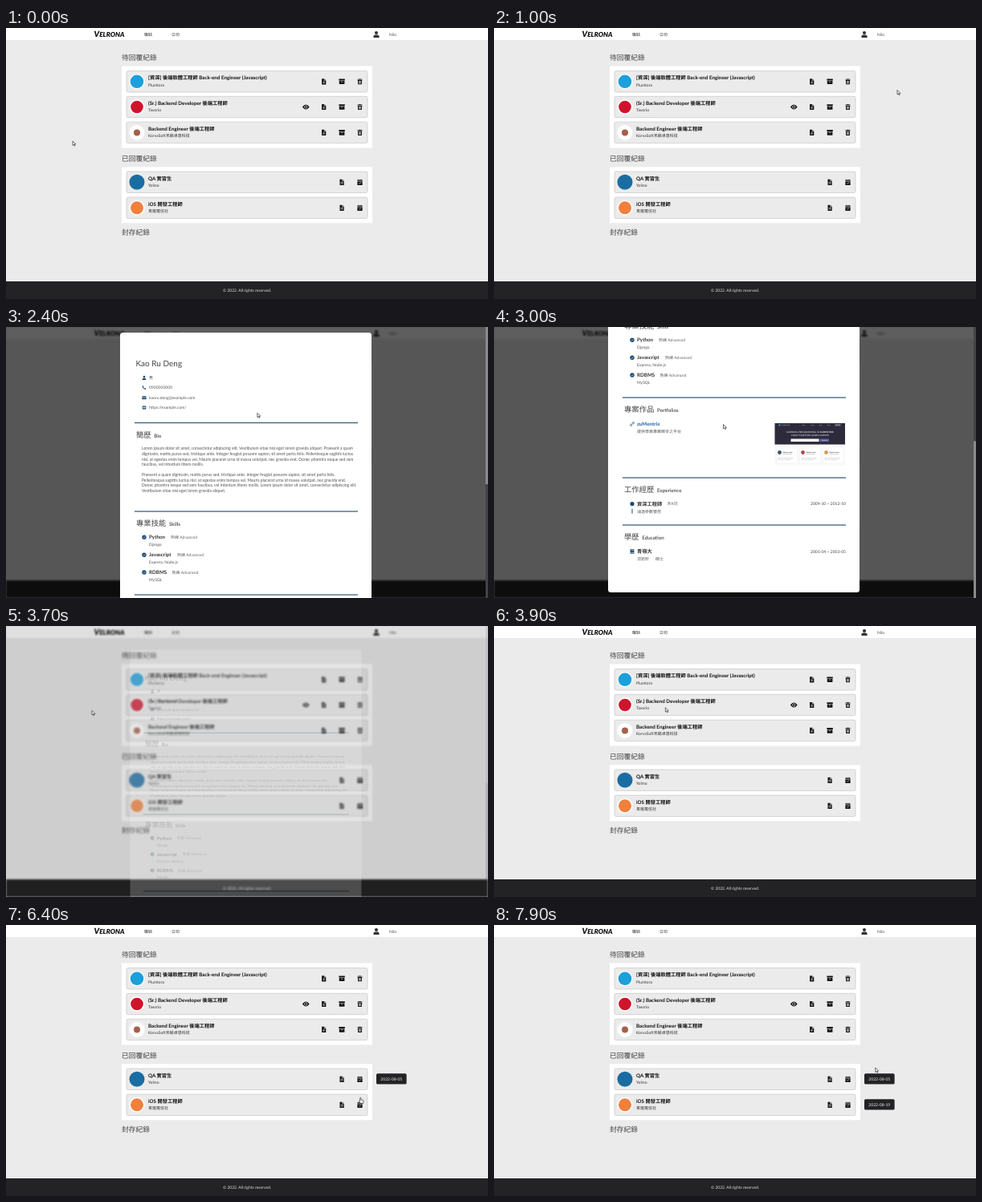
Write an HTML page that moves like this. It is 600x338 px and loops after 8000 ms.

```html
<!DOCTYPE html>
<html lang="zh-Hant">
<head>
<meta charset="utf-8">
<style>
html, body { margin: 0; width: 100%; height: 100%; overflow: hidden; background: #ebebeb; }
svg { display: block; width: 600px; height: 338px; }
svg, p { font-family: Lato, "Noto Sans CJK TC", "Noto Sans CJK JP", sans-serif; }
text { text-rendering: geometricPrecision; white-space: pre; }
p { margin: 0 0 5.6px; font-size: 5px; line-height: 6.8px; height: 27.2px; overflow: hidden; color: #555; }
</style>
</head>
<body>
<svg id="stage" viewBox="0 0 600 338"></svg>
<script>
const NAVY = '#1c4a72', ROW = '#ebebeb', LOOP = 8000;

const rect = (x, y, w, h, fill, more = '') =>
  `<rect x="${x}" y="${y}" width="${w}" height="${h}" fill="${fill}" ${more}/>`;
const disc = (x, y, r, fill) => `<circle cx="${x}" cy="${y}" r="${r}" fill="${fill}"/>`;
const path = (d, more = '') => `<path d="${d}" ${more}/>`;
const text = (x, y, size, str, fill = '#333', more = '') =>
  `<text x="${x}" y="${y}" font-size="${size}" fill="${fill}" ${more}>${str}</text>`;
const BOLD = 'font-weight="700"', MID = 'text-anchor="middle"', END = 'text-anchor="end"';

// Icons are centred on 0,0; details are cut in the row colour.
const cut = d => path(d, `fill="none" stroke="${ROW}" stroke-width=".7"`);
const sheet = path('M-2.6-3.6H.7L2.6-1.7V3.6H-2.6Z') + cut('M.6-3.6V-1.6H2.6');
const icons = {
  download: sheet + cut('M0-.9V1.9M-1.3.8L0 2.1 1.3.8'),
  lines: sheet + cut('M-1.5.1H1.5M-1.5 1.7H1.5'),
  archive: path('M-3.7-3.3H3.7V-1.4H-3.7ZM-3.3-.9H3.3V3.3H-3.3Z') + cut('M-1.1.3H1.1'),
  trash: path('M-3-3.1H-1.1L-.7-3.6H.7L1.1-3.1H3V-2.3H-3ZM-2.7-1.8H2.7L2.4 3.5H-2.4Z') +
    cut('M-1.2-.8V2.6M0-.8V2.6M1.2-.8V2.6'),
  eye: path('M-4.4 0Q0-6 4.4 0Q0 6-4.4 0Z') + disc(0, 0, 2, ROW) + disc(0, 0, 1.3, '#111'),
  calendar: path('M-3.1-2.8H-2V-3.6H-1.1V-2.8H1.1V-3.6H2V-2.8H3.1V3.6H-3.1Z') +
    cut('M-3.1-1.2H3.1M-1.4 1.1L-.4 2.1 1.5.2'),
  user: `<circle cy="-2" r="2.1"/>` + path('M-3.7 3.9Q-3.7.6-1 .6H1Q3.7.6 3.7 3.9Z'),
  check: '<circle r="2.7"/>' + cut('M-1.3.1L-.3 1 1.4-.8'),
  dot: '<circle r="2.6"/>',
  link: path('M-.6.6L.6-.6M-.2-1.2L.8-2.1Q1.6-2.5 2.2-1.9T2.1-.7L1.2.2M.2 1.2L-.8 2.1Q-1.6 2.5-2.2 1.9T-2.1.7L-1.2-.2',
    `fill="none" stroke="${NAVY}" stroke-width=".9"`),
  book: path('M-2.4-2.7H2.4V2.7H-1.8Q-2.4 2.7-2.4 2Z') + cut('M-1.7 1.6H2.4M-1-1.3H1.4'),
  phone: path('M-2.4-2L-1.2-2.4-.5-.9-1.1-.3Q-.5.7.3 1.1L.9.5 2.4 1.2 2 2.4Q-1.8 2.3-2.4-2Z'),
  mail: path('M-2.6-2H2.6V2H-2.6Z') + cut('M-2.6-1.6L0 .5 2.6-1.6'),
  globe: '<circle r="2.5"/>' + cut('M-2.5 0H2.5M0-2.5V2.5')
};
const icon = (name, x, y, fill = '#111', scale = 1) =>
  `<g transform="translate(${x} ${y}) scale(${scale})" fill="${fill}">${icons[name]}</g>`;

const job = (cy, title, firm, color, r, tools) =>
  rect(150, cy - 13.2, 300, 26.4, ROW, 'rx="2" stroke="#c6c6c6" stroke-width=".7"') +
  disc(163, cy, 9.5, '#fff') + disc(163, cy, r, color) +
  text(177, cy - 2.4, 6.25, title, '#111', BOLD) + text(177, cy + 5.9, 5, firm) +
  tools.map((name, i) => icon(name, 440.5 - 22.4 * i, cy)).join('');

const pending = ['trash', 'archive', 'download'], replied = ['calendar', 'lines'];
const page =
  rect(0, 0, 600, 338, ROW) + rect(0, 15, 600, 1, '#dcdcdc') + rect(0, 0, 600, 15.4, '#fff') +
  text(109.5, 11, 10, 'V<tspan font-size="8.3">ELRONA</tspan>', '#111', 'font-weight="900" font-style="italic"') +
  text(172, 9.8, 5, '職缺') + text(206, 9.8, 5, '公司') +
  icon('user', 461, 8, '#333') + text(477, 9.8, 5, 'Nilo', '#555') +
  text(144, 40.2, 8.75, '待回覆紀錄', '#444') + rect(144, 47.5, 312, 102, '#fff') +
  job(66.8, '[資深] 後端軟體工程師 Back-end Engineer (Javascript)', 'Plumtora', '#1ba0dc', 8.3, pending) +
  job(98.5, '(Sr.) Backend Developer 後端工程師', 'Tavorio', '#d0142c', 7.8, [...pending, 'eye']) +
  job(130.4, 'Backend Engineer 後端工程師', 'KorvaSoft禾銘卓恩科技', '#a5604a', 4, pending) +
  text(144, 166, 8.75, '已回覆紀錄', '#444') + rect(144, 173.3, 312, 70, '#fff') +
  job(192.3, 'QA 實習生', 'Yolmo', '#1a6da3', 9.5, replied) +
  job(224.3, 'iOS 開發工程師', '青嵐電信社', '#f0803c', 8, replied) +
  text(144, 257.8, 8.75, '封存紀錄', '#444') +
  rect(0, 316, 600, 22, '#232325') +
  text(300, 328.7, 5, '© 2022. All rights reserved.', '#e4e4e4', MID);

const badge = (id, y, date) => `<g id="${id}">` +
  rect(461, y, 37.6, 13.4, '#232325', 'rx="1.6"') + text(479.8, y + 8.5, 5, date, '#f2f2f2', MID) + '</g>';

const rule = y => rect(160, y - .6, 278, 1.2, '#2d5675');
const heading = (y, han, latin) => text(162, y + 3.4, 9.375, han, '#444') +
  text(165.5 + 9.375 * han.length, y + 3.4, 6.25, latin, '#444', 'font-weight="600"');
const contact = (y, name, str) => icon(name, 172, y, NAVY, name == 'user' ? .65 : 1) + text(178, y + 1.8, 5, str, '#555');
const skill = (y, name, x, tech) => icon('check', 172, y, NAVY) +
  text(178, y + 2.2, 6.25, name, '#333', BOLD) +
  text(x, y + 1.8, 5, '熟練 Advanced', '#666') + text(178, y + 11.2, 5, tech, '#555');
const entry = (y, name, title, dates) => icon(name, 172, y, NAVY) +
  text(178, y + 2.2, 6.25, title, '#333', BOLD) + text(438, y + 1.8, 5, dates, '#444', END);

const lorem = 'Lorem ipsum dolor sit amet, consectetur adipiscing elit. Vestibulum vitae nisi eget lorem gravida aliquet. ' +
  'Praesent a quam dignissim, mattis purus sed, tristique ante. Integer feugiat posuere sapien, sit amet porta felis. ' +
  'Pellentesque sagittis luctus nisl, at egestas enim tempus vel. Mauris placerat urna id massa volutpat, nec gravida erat. ' +
  'Donec pharetra neque sed sem faucibus, vel interdum libero mollis.';

const thumb = '<g transform="translate(349.5 366)">' +
  rect(0, 0, 87.5, 52.5, '#fafafa') + rect(0, 0, 87.5, 26.5, '#2d2b3b') +
  disc(6, 2.4, 1.1, '#4aa3d8') + text(8.5, 3, 1.8, 'ZUMENTRIX', '#ddd') +
  [34, 45, 55, 65].map(x => text(x, 3, 1.7, 'Menu', '#ccc')).join('') + rect(75, 1, 7, 2.6, '#77758a', 'rx=".5"') +
  text(43.8, 11.6, 2.9, 'LEARNING PROGRAMMING IN <tspan font-weight="700">ZUMENTRIX</tspan>', '#eee', MID) +
  text(43.8, 15.8, 2.9, 'CODE TOGETHER LEARN HAPPIER', '#eee', MID) +
  rect(20, 19.5, 35, 3.5, '#fff') + rect(56, 19.5, 11.5, 3.5, '#6460a8') + text(61.7, 21.9, 1.9, 'Search', '#fff', MID) +
  [['#39505c', 2], ['#b5434f', 31], ['#d59a4c', 60]].map(([c, x]) =>
    rect(x, 31, 26, 19, '#fff', 'stroke="#e4e4e4" stroke-width=".3"') + disc(x + 4, 36.5, 2.4, c) +
    text(x + 8, 36.5, 2, 'Mentor name', '#333', BOLD) + text(x + 8, 39, 1.7, 'Web developer', '#777') +
    text(x + 2, 43.6, 1.7, 'Learn to build a web page', '#888') + text(x + 2, 46.2, 1.7, 'with clear small steps', '#888')
  ).join('') + '</g>';

const modal =
  rect(142, 7, 313, 570, '#fff', 'rx="3.5"') +
  text(161.5, 49, 10, 'Kao Ru Deng', '#444') +
  contact(63.4, 'user', '男') + contact(75.6, 'phone', '0900000000') +
  contact(88.2, 'mail', 'kaoru.deng@example.com') + contact(100.5, 'globe', 'https://example.com/') +
  rule(119.5) + heading(134.3, '簡歷', 'Bio') +
  `<foreignObject x="169" y="148" width="269" height="70"><p>${lorem}</p><p>${lorem.slice(107)} ${lorem.slice(0, 106)}</p></foreignObject>` +
  rule(230) + heading(244.2, '專業技能', 'Skills') +
  skill(262.2, 'Python', 205, 'Django') + skill(284.2, 'Javascript', 213, 'Express, Node.js') +
  skill(306, 'RDBMS', 206.5, 'MySQL') +
  rule(334) + heading(349, '專案作品', 'Portfolios') +
  icon('link', 172, 367, NAVY) + text(178, 369, 6.25, 'zuMentrix', '#1c5fa6', BOLD) +
  text(178, 377.6, 5, '提供學員專案媒合之平台', '#555') + thumb +
  rule(434) + heading(448.5, '工作經歷', 'Experience') +
  entry(466.6, 'dot', '資深工程師', '2009-10 ~ 2012-10') + text(215.5, 468.4, 5, '禾K坊', '#666') +
  rect(171.5, 472.6, 1, 6, NAVY) + text(178, 477.6, 5, '油溫參數管控', '#555') +
  rule(493) + heading(508, '學歷', 'Education') +
  entry(526, 'book', '青嶺大', '2001-04 ~ 2003-05') +
  text(178, 536.8, 5, '沼岩所', '#555') + text(201, 536.8, 5, '碩士', '#555');

const outline = 'fill="#fff" stroke="#111" stroke-width=".6" stroke-linejoin="round"';
stage.innerHTML =
  `<g id="base">${page}${badge('date1', 185.2, '2022-08-05')}${badge('date2', 217.2, '2022-08-19')}</g>` +
  rect(0, 0, 600, 338, '#000', 'id="shade"') +
  `<g id="box">${modal}</g>` +
  `<g id="bar">${rect(597, 0, 3, 338, '#444')}${rect(597, 0, 3, 196, '#8a8a8a', 'id="grip"')}</g>` +
  '<g id="loader">' + rect(0, 0, 600, 338, '#fff', 'id="veil"') +
  path('M4.2-3.8A5.7 5.7 0 1 0 4.2 3.8', 'id="ring" fill="none" stroke="#222" stroke-width="1.4"') + '</g>' +
  '<g id="pointer">' + path('M0 0V5.4L1.3 4.3 2.2 6.2 3 5.8 2.2 4H3.9Z', outline + ' id="arrow"') +
  path('M.7 4.6V.7Q1.3-.1 1.9.7V2.9L4.7 3.5Q5.2 3.7 5.1 4.4L4.5 7.6H1.4L-.6 4.9Q-.4 4 .7 4.6Z', outline + ' id="hand"') + '</g>';

// Linear interpolation through rows of [time, ...values].
function at(keys, t) {
  const i = keys.findIndex(k => k[0] > t);
  if (i < 0) return keys.at(-1).slice(1);
  if (!i) return keys[0].slice(1);
  const a = keys[i - 1], b = keys[i], f = (t - a[0]) / (b[0] - a[0]);
  return a.slice(1).map((v, j) => v + (b[j + 1] - v) * f);
}

const moves = [[100, 83, 141], [300, 140, 32], [500, 165, 205], [650, 300, 220], [800, 520, 150], [1000, 502, 77.5],
  [1200, 440, 70], [1500, 395, 64.5], [2100, 395, 64.5], [2500, 285.5, 121.5], [3100, 285.5, 121.5], [3450, 107, 105.5],
  [3700, 107, 105.5], [4200, 373, 96], [4600, 373, 96], [4950, 491.5, 104.5], [5500, 491.5, 104.5], [5900, 440, 191],
  [6150, 440, 191], [6500, 440, 224.5], [6900, 440, 224.5], [7300, 490, 128], [7800, 520, 156.5], [7900, 474.8, 178]];
// open, shade, blur, veil
const phases = [[1700, 0, 0, 0, 0], [1800, 0, 0, 0, .5], [1900, 0, .1, 0, .6], [2000, .45, .34, 0, .47],
  [2100, .9, .56, .8, .15], [2200, 1, .63, 1.1, 0], [3600, 1, .63, 1.1, 0], [3700, .2, .125, .9, 0], [3800, 0, 0, .4, 0], [3900, 0, 0, 0, 0]];
const scrolls = [[2500, 0], [2900, 246], [3100, 246], [3400, 0]];
const within = (t, ...spans) => spans.some(([a, b]) => t >= a && t < b);
const show = (el, on) => el.style.display = on ? '' : 'none';
const $ = id => document.getElementById(id);

function draw(now) {
  const t = Math.floor(now % LOOP / 100) * 100; // ten steps a second
  const [x, y] = at(moves, t), [open, shade, blur, veil] = at(phases, t), [scroll] = at(scrolls, t);
  const scale = .9 + .1 * open;
  $('base').style.filter = blur ? `blur(${blur}px)` : 'none';
  $('shade').setAttribute('opacity', shade);
  for (const id of ['box', 'bar']) {
    show($(id), open > 0);
    $(id).setAttribute('opacity', open);
  }
  $('box').setAttribute('transform', `translate(298.5 ${292 - scroll}) scale(${scale}) translate(-298.5 -292)`);
  $('grip').setAttribute('y', scroll * 338 / 584);
  show($('loader'), veil > 0);
  $('veil').setAttribute('opacity', veil);
  $('ring').setAttribute('transform', `translate(294 141.5) rotate(${(t - 2000) * .36})`);
  show($('date1'), t >= 6000);
  show($('date2'), t >= 7000);
  const hand = within(t, [1400, 2200], [5800, 7000]);
  show($('hand'), hand);
  show($('arrow'), !hand);
  $('pointer').setAttribute('transform', `translate(${x} ${y})`);
  requestAnimationFrame(() => draw(performance.now() - start));
}
const start = performance.now();
draw(0);
</script>
</body>
</html>
```
